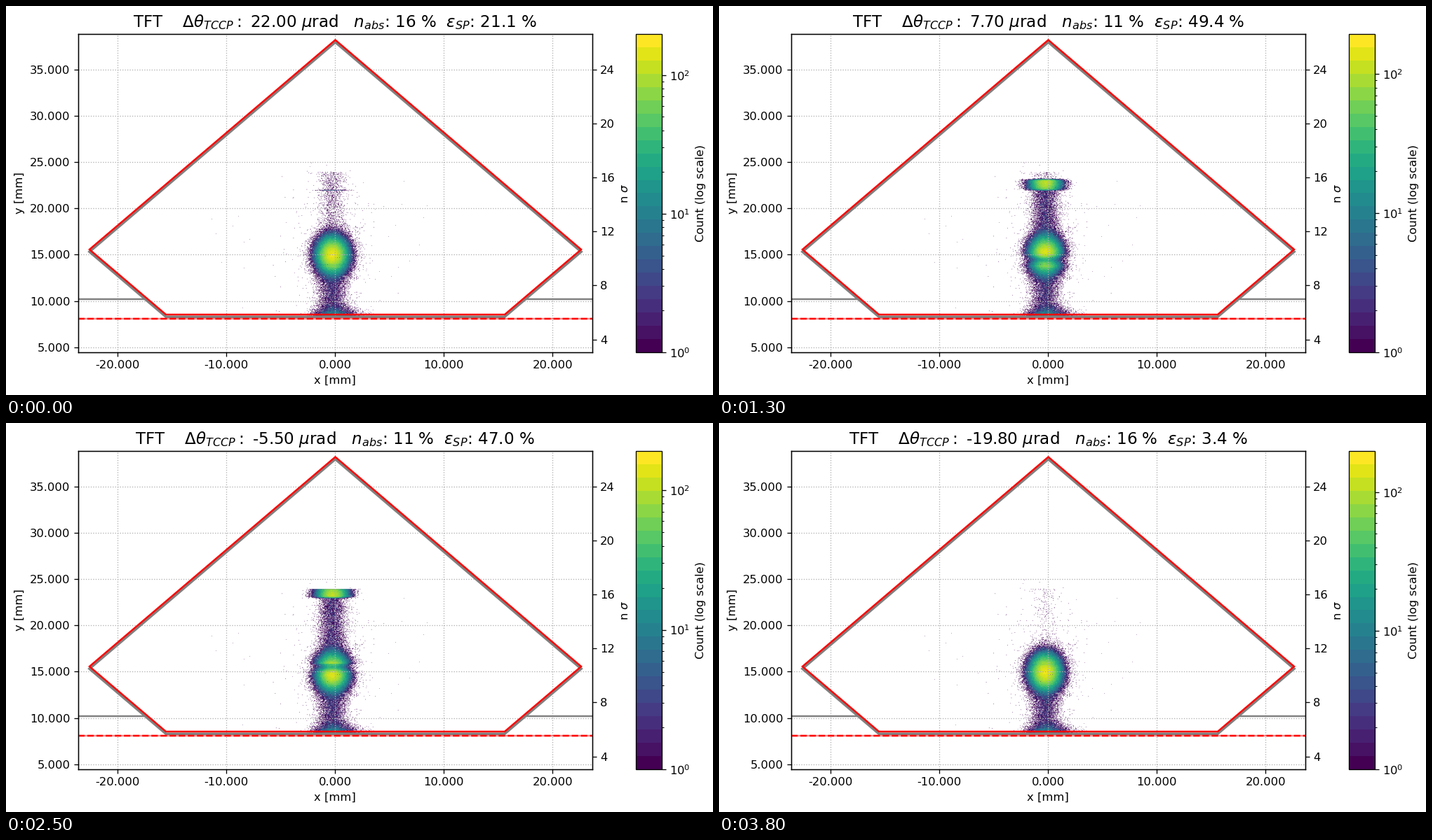
Animation, 1008 px wide and 556 px high, one loop 3.9 s. Source, as a matplotlib script:

```python
import numpy as np
import matplotlib.pyplot as plt
from matplotlib.animation import FuncAnimation
from matplotlib.cm import ScalarMappable
from matplotlib.colors import LogNorm
from matplotlib.patches import Polygon
from matplotlib.ticker import FormatStrFormatter, MultipleLocator

WIDTH, HEIGHT, DPI = 1008, 556, 118
FRAMES, INTERVAL = 39, 100
LEFT, RIGHT, TOP, BOTTOM = 103, 835.5, 40, 495
X_SCALE, Y_SCALE = 15.5, 13.235          # pixels per mm
X_ZERO, Y_FIVE = 469.2, 487.7
SIGMA_MM = 35 / 24

plt.rcParams["font.family"] = "DejaVu Sans"


def to_mm(px, py):
    return (np.asarray(px) - X_ZERO) / X_SCALE, 5 + (Y_FIVE - np.asarray(py)) / Y_SCALE


def rect(left, right):
    return [left / WIDTH, 1 - BOTTOM / HEIGHT, (right - left) / WIDTH, (BOTTOM - TOP) / HEIGHT]


def bell(values, center, width, power=2):
    return np.exp(-0.5 * np.abs((values - center) / width) ** power)


def step(value):
    return 1 / (1 + np.exp(-0.442 * value))


# Readouts as functions of the crystal angle in microradians
def efficiency(angle):
    plateau = 48.8 + 0.12 * angle - 0.003 * angle ** 2
    return plateau * step(angle + 14.131) * step(21.289 - angle)


def absorbed(angle):
    return 16.2 - 5.5 * bell(angle, 1.8, 10.9, power=4)


def peak_count(angle):
    return 198 - 27 * bell(angle, 0.5, 3.6)


# Histogram grid, in stage pixels
BIN = 0.7
GX0, GX1, GY0, GY1 = 380, 562, 222, 446
gx = np.arange(GX0 + BIN / 2, GX1, BIN)[None, :]
gy = np.arange(GY0 + BIN / 2, GY1, BIN)[:, None]

# Fixed Poisson arrivals: a bin's count is the number of arrivals below its density
rng = np.random.default_rng(4)
arrivals = np.cumsum(rng.standard_exponential((240, gy.size, gx.size), dtype=np.float32), axis=0)

BEAM_X, BEAM_Y, BEAM_PEAK = 465.0, 356.5, 155
BAND_TOP, BAND_END, BAND_SHIFT = 238, 264.8, 106.5


def beam(y):
    return BEAM_PEAK * bell(gx, BEAM_X, 10.3) * bell(y, BEAM_Y, 12.2)


def band_center(angle):
    return 248.4 + 1.02 * angle + 0.003 * angle ** 2


def in_band(y):
    return (y > BAND_TOP) & (y < BAND_END)


column = bell(gx, BEAM_X, 9.5)
halo = (0.1 * bell(gx, BEAM_X + 2, 19) * bell(gy, BEAM_Y, 24)
        + 0.012 * bell(gx, BEAM_X, 30) * bell(gy, 350, 70))
foot = (2.2 * column / (1 + np.exp((385 - gy) / 3))
        + 13 * bell(gx, 466, 12.5) * bell(gy, 447, 7.5)
        + 3 * bell(gx, 477, 14) * bell(gy, 447, 7))


def density(angle):
    center = band_center(angle)
    source = gy - BAND_SHIFT
    lost = 0.78 * in_band(source) * bell(source, center, 5)
    channelled = 0.72 * in_band(gy) * bell(gy, center, 6.7, power=8)
    stream = 0.04 + 2.0 * (efficiency(angle) / 49) ** 2.2
    above = min(stream, 0.03 + 0.35 * (angle + 20) / 42)
    level = np.where((gy < center) & (gy < BAND_END), above, stream)
    level = level * (gy > BAND_TOP) * (gy < BEAM_Y)
    return (halo + foot + beam(gy) * (1 - lost)
            + channelled * beam(gy + BAND_SHIFT) + level * column)


# The small margin keeps the pixel size from being truncated
fig = plt.figure(figsize=((WIDTH + 0.01) / DPI, (HEIGHT + 0.01) / DPI), dpi=DPI, facecolor="white")
ax = fig.add_axes(rect(LEFT, RIGHT))
image = ax.imshow(np.zeros((gy.size, gx.size, 4)), aspect="auto", interpolation="antialiased",
                  extent=[*to_mm([GX0, GX1], 0)[0], *to_mm(0, [GY1, GY0])[1]])

(x_min, x_max), (y_min, y_max) = to_mm([LEFT, RIGHT], [BOTTOM, TOP])
ax.set(xlim=(x_min, x_max), ylim=(y_min, y_max), xlabel="x [mm]", ylabel="y [mm]")
ax.xaxis.set_major_locator(MultipleLocator(10))
ax.yaxis.set_major_locator(MultipleLocator(5))
for axis in (ax.xaxis, ax.yaxis):
    axis.set_major_formatter(FormatStrFormatter("%.3f"))
ax.grid(linestyle=":")

# Stray hits far from the beam
ax.plot(*to_mm(rng.normal(468, 75, 60), np.clip(rng.normal(345, 45, 60), 230, 438)),
        ",", color="#440154", alpha=0.35)

outline = np.array([(469.5, 48.5), (820, 348), (711, 441), (228, 441), (119, 348)])
for shift, color, weight in ((3.2, "gray", 2.2), (0, "red", 1.5)):
    corners = np.column_stack(to_mm(outline[:, 0], outline[:, 1] + shift))
    ax.add_patch(Polygon(corners, fill=False, edgecolor=color, linewidth=weight, zorder=3))
for start, end in ((LEFT, 198), (741, RIGHT)):
    ax.plot(*to_mm([start, end], [419.3, 419.3]), color="gray", linewidth=1.5)
floor = to_mm(0, 447.5)[1]
ax.axhline(floor, color="red", alpha=0.45, linewidth=1.5, zorder=4)
ax.axhline(floor, color="red", linestyle="--", linewidth=1.5, zorder=4)

sigma_ax = ax.twinx()
sigma_ax.set(ylim=(y_min / SIGMA_MM, y_max / SIGMA_MM), ylabel=r"n $\sigma$")
sigma_ax.yaxis.set_major_locator(MultipleLocator(4))

mapper = ScalarMappable(LogNorm(1, 198), plt.get_cmap("viridis", 24))
bar = fig.colorbar(mapper, cax=fig.add_axes(rect(898, 935)))
bar.set_label("Count (log scale)")
title = ax.set_title("", fontsize=14)


def update(frame):
    angle = round(22 - 1.1 * frame, 2) + 0.0
    counts = np.count_nonzero(arrivals < density(angle).astype(np.float32), axis=0)
    mapper.set_clim(1, peak_count(angle))
    colors = mapper.to_rgba(np.maximum(counts, 1))
    colors[..., 3] = counts > 0
    image.set_data(colors)
    title.set_text(rf"TFT    $\Delta\theta_{{TCCP}}:$ {angle:.2f} $\mu$rad   "
                   rf"$n_{{abs}}$: {absorbed(angle):.0f} %  "
                   rf"$\epsilon_{{SP}}$: {efficiency(angle):.1f} %")
    return image, title


anim = FuncAnimation(fig, update, frames=FRAMES, interval=INTERVAL, repeat=True, repeat_delay=0)
plt.show()
```
